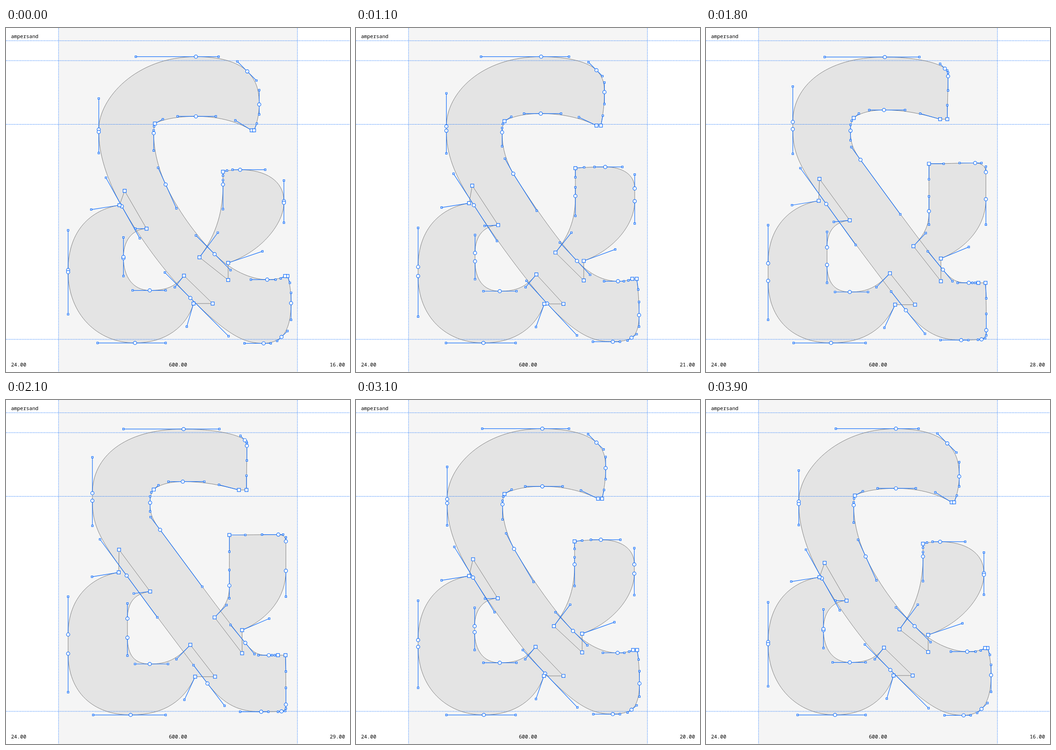
Recreate the animation shown at these times as an HTML page with a canvas. Size 748 by 748 pixels, loop 4000 ms.

```html
<!DOCTYPE html>
<html lang="en">
<head>
<meta charset="utf-8">
<title>ampersand</title>
<style>
  html, body { margin: 0; width: 100%; height: 100%; overflow: hidden; background: #fff; }
  canvas { display: block; }
</style>
</head>
<body>
<canvas id="stage" width="748" height="748"></canvas>
<script>
const ctx = document.getElementById('stage').getContext('2d');
const SIZE = 748, UNIT = SIZE / 864, ORIGIN_X = 132, ORIGIN_Y = 782, ADVANCE = 600;
const BLUE = '#1570fb', FRAMES = 40, FRAME_MS = 100;
const LEFT = 180, RIGHT = 0, UP = 90, DOWN = -90;

// Builds one master of the glyph in font units, y up: the casual or the linear one.
function buildMaster(isLinear) {
  const contours = [];
  const m = (casual, linear) => isLinear ? linear : casual;
  const contour = () => contours.push([]);
  const corner = (x, y, into, out) => contours.at(-1).push({
    at: [x, y],
    into: into && [x + into[0], y + into[1]],
    out: out && [x + out[0], y + out[1]]
  });
  // A smooth node has both handles on one tangent; a zero length means a straight side.
  const smooth = (x, y, angle, into, out) => {
    const a = angle * Math.PI / 180;
    const handle = length => length && [Math.cos(a) * length, Math.sin(a) * length].map(Math.round);
    corner(x, y, handle(-into), handle(out));
    contours.at(-1).at(-1).smooth = true;
  };
  const side = (x, y1, y2, angle, into, out) => {
    smooth(x, y1, angle, into, 0);
    smooth(x, y2, angle, 0, out);
  };

  // Main stroke
  contour();
  const foot = m(159, 141), rim = m(525, 556);
  smooth(m(345, 314), m(710, 709), LEFT, m(57, 90), 151);
  side(m(101, 85), m(527, 548), m(521, 529), DOWN, m(78, 90), m(53, 63));
  smooth(m(159, 171), m(334, 341), m(-61, -53.5), m(82, 113), m(92, 130));
  smooth(m(331, 374), m(104, 70), m(-45, -52.5), m(91, 58), m(136, 71));
  smooth(m(515, 509), m(-10, -1), RIGHT, m(48, 53), 18);
  smooth(560, m(6, 0), m(44, 6), m(15, 9), m(21, 9));
  smooth(m(584, 571), m(91, 17), UP, m(42, 10), m(26, 42));
  corner(m(575, 570), foot, [m(6, 1), m(-17, -41)]);
  corner(m(569, 551), foot, null, [m(-11, -8), m(-6, 0)]);
  smooth(m(524, 528), m(150, 141), LEFT, m(21, 8), m(41, 26));
  smooth(m(392, 469), m(214, 172), m(135, 129), m(56, 36), m(66, 58));
  smooth(m(269, 255), m(389, 456), m(114, 126.6), m(66, 178), m(46, 40));
  smooth(m(239, 230), m(518, 524), UP, m(44, 22), m(7, 16));
  corner(m(242, 239), m(542, 557), [m(-2, -6), -7], [m(20, 12), 11]);
  smooth(m(345, 312), m(560, 577), RIGHT, m(46, 36), m(50, 54));
  corner(m(485, 453), rim, [m(-41, -50), m(25, 13)]);
  corner(m(491, 472), rim, null, [m(7, 0), m(17, 36)]);
  smooth(m(504, 473), m(590, 667), UP, m(25, 37), m(36, 7));
  smooth(m(474, 468), m(673, 681), 135, m(33, 5), m(36, 16));

  // Bowl
  contour();
  const notch = m(90, 87);
  corner(m(153, 151), m(337, 349), null, [m(-71, -67), -11]);
  side(24, m(174, 193), m(169, 145), DOWN, m(100, 95), m(106, 97));
  smooth(m(192, 181), -9, RIGHT, 94, m(77, 88));
  corner(m(339, 343), notch, [m(-17, -27), -58]);
  corner(m(387, 393), notch);
  corner(m(315, 331), m(160, 167), null, [m(-23, -35), m(-29, -36)]);
  smooth(229, m(123, 119), LEFT, m(40, 46), m(43, 37));
  side(m(163, 173), m(204, 185), m(207, 233), UP, 45, m(49, 38));
  corner(m(221, 230), m(278, 301), [m(-28, -41), m(0, -5)]);
  corner(m(166, 152), m(373, 406));

  // Arm
  contour();
  const stem = m(413, 429), crotch = m(426, 461);
  corner(stem, m(421, 443), [0, m(-10, -42)], [m(10, 40), m(3, 0)]);
  smooth(m(456, 552), m(426, 444), RIGHT, m(19, 41), m(63, 12));
  side(m(566, 571), m(347, 427), m(343, 353), DOWN, m(52, 10), m(50, 65));
  corner(crotch, m(192, 204), [m(86, 68), 29]);
  corner(crotch, m(149, 146));
  corner(m(354, 392), m(206, 236), null, [m(46, 30), m(62, 31)]);
  smooth(stem, m(389, 316), UP, m(62, 32), m(11, 39));
  return contours;
}

const casual = buildMaster(false), linear = buildMaster(true);

function interpolate(amount) {
  const mix = (a, b) => a && a.map((v, i) => Math.round(v + (b[i] - v) * amount));
  return casual.map((nodes, c) => nodes.map((node, n) => {
    const other = linear[c][n];
    return {
      smooth: node.smooth,
      at: mix(node.at, other.at),
      into: mix(node.into, other.into),
      out: mix(node.out, other.out)
    };
  }));
}

function outline(nodes) {
  const path = new Path2D();
  path.moveTo(...nodes[0].at);
  nodes.forEach((node, n) => {
    const next = nodes[(n + 1) % nodes.length];
    if (node.out) path.bezierCurveTo(...node.out, ...next.into, ...next.at);
    else path.lineTo(...next.at);
  });
  path.closePath();
  return path;
}

function line(a, b) {
  ctx.beginPath();
  ctx.moveTo(...a);
  ctx.lineTo(...b);
  ctx.stroke();
}

function marker([x, y], size, round) {
  ctx.beginPath();
  if (round) ctx.arc(x, y, size / 2, 0, Math.PI * 2);
  else ctx.rect(x - size / 2, y - size / 2, size, size);
  ctx.fill();
  ctx.stroke();
}

function drawGuides() {
  const [left, right, bottom, top] = [-ORIGIN_X, 864 - ORIGIN_X, ORIGIN_Y - 864, ORIGIN_Y];
  ctx.strokeStyle = BLUE;
  ctx.lineWidth = 1.15;
  ctx.setLineDash([2, 2]);
  for (const x of [0, ADVANCE]) line([x, top], [x, bottom]);
  for (const y of [0, 540, 700, 750]) line([left, y], [right, y]);
  ctx.setLineDash([]);
}

function drawNodes(nodes) {
  const handles = nodes.flatMap(({ at, into, out }) => [into, out].filter(Boolean).map(end => ({ at, end })));
  ctx.strokeStyle = BLUE;
  ctx.fillStyle = '#fff';
  ctx.lineWidth = 1.4;
  for (const { at, end } of handles) line(at, end);
  for (const { end } of handles) marker(end, 4);
  for (const { at, smooth } of nodes) marker(at, smooth ? 8.5 : 8, smooth);
}

function drawGlyph(amount) {
  const shapes = interpolate(amount), paths = shapes.map(outline);
  ctx.setTransform(UNIT, 0, 0, -UNIT, ORIGIN_X * UNIT, ORIGIN_Y * UNIT);
  ctx.fillStyle = '#f5f5f5';
  ctx.fillRect(0, ORIGIN_Y - 864, ADVANCE, 864);
  ctx.fillStyle = '#e4e4e4';
  paths.forEach(path => ctx.fill(path));
  drawGuides();
  ctx.strokeStyle = '#808080';
  paths.forEach(path => ctx.stroke(path));
  drawNodes(shapes.flat());
  ctx.resetTransform();
}

function label(text, x, y, align) {
  ctx.textAlign = align;
  ctx.fillText(text, x, y);
}

function drawLabels(amount) {
  ctx.font = '500 11px "Noto Sans Mono", "DejaVu Sans Mono", monospace';
  ctx.fillStyle = '#000';
  label('ampersand', 11, 21.5, 'left');
  label('24.00', 11, 736, 'left');
  label('600.00', SIZE / 2, 736, 'center');
  label(Math.round(16 + 13 * amount).toFixed(2), SIZE - 11, 736, 'right');
}

function draw(time) {
  const step = Math.floor(time / FRAME_MS) % FRAMES;
  const u = 1 - Math.abs(1 - step / (FRAMES / 2));
  const amount = 1.62 * u ** 2 - 0.54 * u ** 3;
  ctx.fillStyle = '#fff';
  ctx.fillRect(0, 0, SIZE, SIZE);
  drawGlyph(amount);
  drawLabels(amount);
}

const begin = performance.now();
function tick() {
  draw(performance.now() - begin);
  requestAnimationFrame(tick);
}
tick();
</script>
</body>
</html>
```
